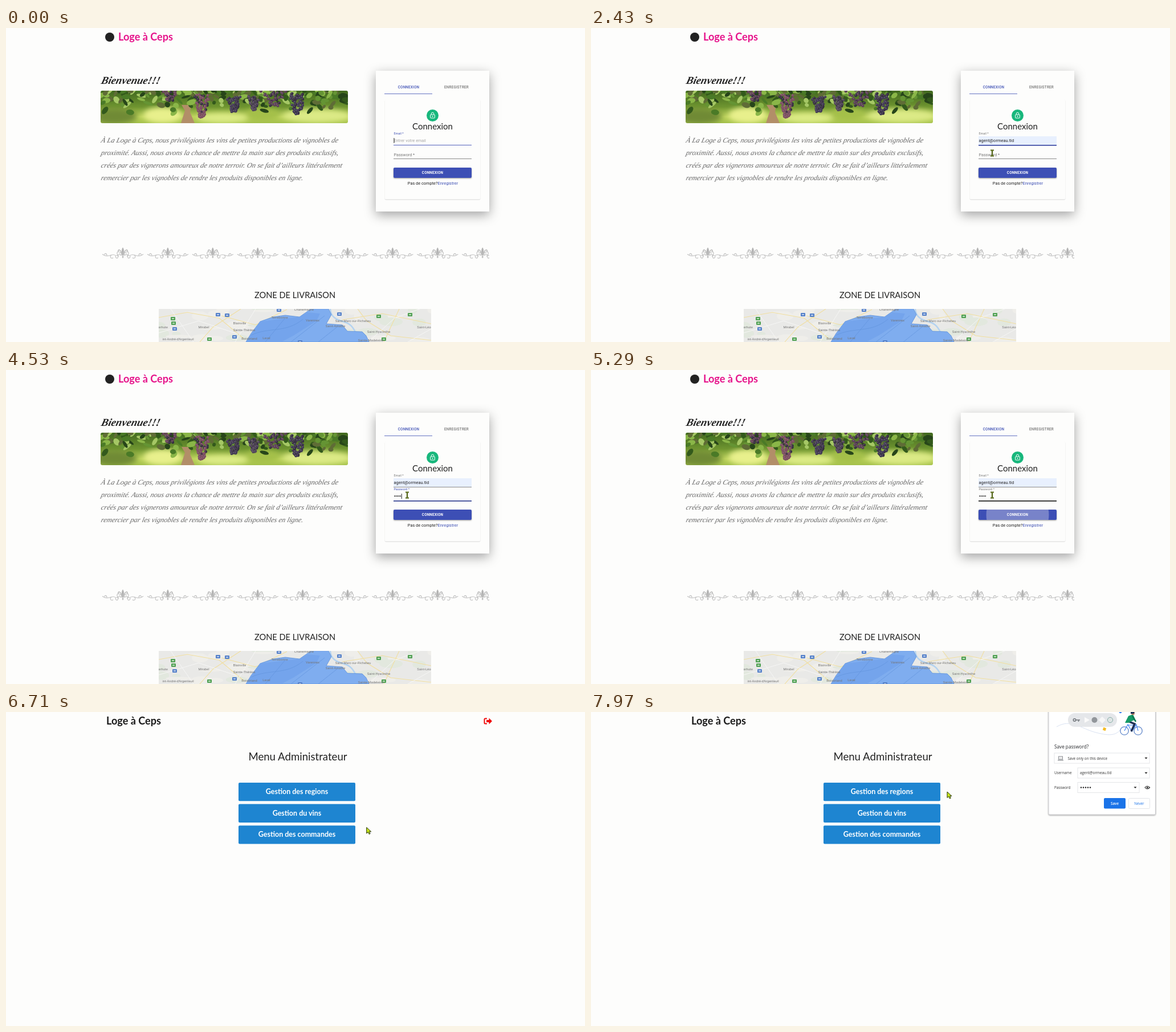
Recreate the animation shown at these times as an HTML page. Size 1016 px wide and 551 px high, loop 8000 ms.

```html
<!DOCTYPE html>
<html lang="fr">
<head>
<meta charset="utf-8">
<title>La Loge à Ceps</title>
<style>
  html, body { margin: 0; width: 100%; height: 100%; overflow: hidden; background: #fdfdfc; }
  svg { display: block; width: 1016px; height: 551px; }
  text { white-space: pre; }
  .lato { font-family: Lato, sans-serif; }
  .robo { font-family: Roboto, sans-serif; }
  .open { font-family: "Open Sans", "Noto Sans", sans-serif; }
  .script { font-family: "Liberation Serif", "Noto Serif", serif; font-style: italic; }
  .mid { text-anchor: middle; }
</style>
</head>
<body>
<svg id="stage" viewBox="0 0 1016 551" xmlns="http://www.w3.org/2000/svg"></svg>
<script>
const LOOP = 8000;
const PAPER = '#fdfdfc';
const stage = document.getElementById('stage');

// Markup helpers
const text = (x, y, size, str, cls, fill = '#222', more = '') =>
  `<text x="${x}" y="${y}" font-size="${size}" class="${cls}" fill="${fill}" ${more}>${str}</text>`;
const rect = (x, y, w, h, fill, more = '') =>
  `<rect x="${x}" y="${y}" width="${w}" height="${h}" fill="${fill}" ${more}/>`;
const oval = (x, y, rx, ry, fill, more = '') =>
  `<ellipse cx="${x}" cy="${y}" rx="${rx}" ry="${ry}" fill="${fill}" ${more}/>`;
const path = (d, stroke, width = 1, fill = 'none', more = '') =>
  `<path d="${d}" stroke="${stroke}" stroke-width="${width}" fill="${fill}" ${more}/>`;
const group = (id, body, more = '') => `<g id="${id}" ${more}>${body}</g>`;
const BOLD = 'font-weight="700"', MEDIUM = 'font-weight="500"';

function seeded(seed) {
  return () => (seed = (seed * 16807) % 2147483647) / 2147483647;
}

const shadow = (id, dy, blur, opacity) =>
  `<filter id="${id}" x="-30%" y="-30%" width="160%" height="180%">
    <feDropShadow dx="0" dy="${dy}" stdDeviation="${blur}" flood-color="#000" flood-opacity="${opacity}"/></filter>`;

const defs = `<defs>
  ${shadow('panelShadow', 6, 10, .36)}${shadow('lift', 1, 1.1, .4)}${shadow('faint', .6, .7, .3)}
  <filter id="soft"><feGaussianBlur stdDeviation=".5"/></filter>
  <filter id="haze"><feGaussianBlur stdDeviation="5"/></filter>
  <linearGradient id="vines" x2="0" y2="1">
    <stop offset="0" stop-color="#41681f"/><stop offset=".5" stop-color="#6f9530"/>
    <stop offset=".8" stop-color="#bdd35c"/><stop offset="1" stop-color="#a3c04a"/></linearGradient>
  <clipPath id="photoClip"><rect x="166" y="110" width="434" height="57" rx="3"/></clipPath>
  <clipPath id="mapClip"><rect x="268" y="493" width="478" height="58"/></clipPath>
  <clipPath id="ornamentClip"><rect x="166" y="380" width="682" height="30"/></clipPath>
  <clipPath id="buttonClip"><rect x="680" y="245" width="137" height="18" rx="2"/></clipPath>
  <clipPath id="listClip"><rect id="listWindow" x="680" y="207" width="137" height="54"/></clipPath>
  <g id="fleur">${ornament()}</g>
</defs>`;

function ornament() {
  const side = path('M7 401C10 397 15 400 12 403S7 401 10 398M12 400C18 393 25 405 36 397M28 399C28 395 33 395 32 398M20 398C24 402 20 406 17 403M2 396C6 391 11 392 10 396S5 398 6 395', '#c2c2c2', 1.1);
  return side + `<g transform="scale(-1 1)">${side}</g>` +
    path('M0 385C3 389 2 393 1 398H-1C-2 393-3 389 0 385Z', 'none', 0, '#b4b4b4') +
    path('M2 397C3 388 9 388 8 392M-2 397C-3 388-9 388-8 392', '#b8b8b8', 1.6) +
    rect(-5, 397.5, 10, 1.5, '#b8b8b8') + oval(0, 401.5, 1.4, 2.2, '#c0c0c0');
}

function photo() {
  const rnd = seeded(71);
  const pick = list => list[Math.floor(rnd() * list.length)];
  const ground = oval(190, 155, 40, 14, '#6f8a35') + oval(275, 153, 34, 14, '#e8f08c') +
    oval(380, 158, 45, 9, '#dceb86') + oval(450, 152, 30, 12, '#a4c04a') + oval(545, 154, 60, 12, '#dcea86');
  let out = rect(166, 110, 434, 57, 'url(#vines)') + `<g filter="url(#haze)">${ground}</g>`;
  out += path('M307 167L314 145L308 135H325L323 148L331 167Z', 'none', 0, '#b28e68');
  for (let i = 0; i < 230; i++) {
    const x = 166 + rnd() * 434, y = 109 + rnd() * rnd() * 42;
    out += oval(x, y, 3 + rnd() * 6, 2 + rnd() * 3,
      pick(['#33591c', '#4a7a27', '#659434', '#8ab648', '#27451a', '#5f6c36', '#a5c765']),
      `transform="rotate(${rnd() * 120 - 60} ${x} ${y})"`);
  }
  const clusters = [[288, 110, 15, 18, '#684658'], [344, 117, 14, 40, '#7d5060'],
    [400, 121, 13, 26, '#443c55'], [435, 120, 10, 24, '#52485a'],
    [471, 109, 25, 28, '#5c4356'], [511, 115, 16, 36, '#413c54']];
  for (const [cx, top, half, tall, tone] of clusters) {
    for (let i = 0; i < tall * 1.6; i++) {
      const v = i / tall / 1.6, x = cx + (rnd() * 2 - 1) * half * (1 - v * .7), y = top + v * tall;
      out += oval(x, y, 2.5, 2.5, rnd() < .3 ? '#352e40' : tone) + oval(x - .7, y - .8, .9, .8, '#a98fa8', 'opacity=".55"');
    }
  }
  return `<g clip-path="url(#photoClip)"><g filter="url(#soft)">${out}</g></g>`;
}

function map() {
  const rnd = seeded(19);
  let out = rect(268, 493, 478, 58, '#e9e9e7');
  for (let i = 0; i < 34; i++)
    out += oval(268 + rnd() * 478, 493 + rnd() * 58, 5 + rnd() * 18, 2 + rnd() * 6, rnd() < .4 ? '#e2e8de' : '#efeeea');
  out += path('M268 508L318 499L374 509L417 545M340 551L363 525L412 493M378 505L438 521L493 494M617 493L633 514L675 540L746 548M590 512L660 501L746 519M690 493L663 551', '#f1dfa0', 1.1);
  out += path('M268 535L338 514L407 537M289 493L329 551M438 493L402 551M636 551L682 509L726 493M705 551L746 528', '#f8f8f6', .9);
  out += path('M569 493C570 510 583 512 597 517S614 538 622 551', '#b4d3f0', 2.5);
  out += path('M421 551L430 536L446 515L469 507L490 504L515 507L535 493H566L571 503L562 519L590 521L599 532L625 533L632 540L637 551Z', '#5c90da', .8, '#7fadef');
  out += path('M421 551L446 515L515 507L529 499L551 501L545 514L504 540L483 551Z', 'none', 0, '#74a4ec');
  out += path('M430 539C462 524 491 536 521 511M455 551L489 510M500 551L559 505M548 551L583 523', '#6294dd', .7);
  const shield = (x, y, fill) => rect(x - 4, y - 3, 8, 6, fill, 'rx="1"') + rect(x - 2, y - .6, 4, 1.2, '#fff');
  for (const [x, y] of [[293, 510], [294, 518], [357, 546], [709, 503], [654, 506], [663, 546]]) out += shield(x, y, '#4fa052');
  for (const [x, y] of [[372, 503], [388, 504], [296, 528], [401, 542], [479, 495], [585, 502], [516, 551]]) out += shield(x, y, '#5480c9');
  const towns = [[410, 520, 'Blainville'], [418, 532, 'Sainte-Thérèse'], [427, 547, 'Boisbriand'], [347, 527, 'Mirabel'],
    [523, 496, 'Charlemagne'], [480, 510, 'Terrebonne'], [457, 546, 'Laval'], [578, 525, 'Saint-Amable'],
    [609, 516, 'Saint-Marc-sur-Richelieu'], [654, 535, 'Saint-Hyacinthe'], [640, 550, 'Sainte-Madeleine'],
    [735, 527, 'Saint-Léon'], [274, 527, 'herhute'], [302, 548, "int-André-d'Argenteuil"], [538, 515, 'Varennes']];
  for (const [x, y, name] of towns) out += text(x, y, 5.8, name, 'robo mid', '#777');
  return `<g clip-path="url(#mapClip)">${out}</g>`;
}

// Handwriting leans further than the plain italic
const handwritten = (x, y, size, str, fill, more) =>
  `<g transform="translate(${x} ${y}) skewX(-14)">${text(0, 0, size, str, 'script', fill, more)}</g>`;

function home() {
  let out = oval(182, 16, 8, 8, '#222') + text(197, 22, 18.1, 'Loge à Ceps', 'lato', '#e6148b', BOLD);
  out += handwritten(166, 98, 18.6, 'Bienvenue!!!', '#222', BOLD) + photo();
  ['À La Loge à Ceps, nous privilégions les vins de petites productions de vignobles de',
   'proximité. Aussi, nous avons la chance de mettre la main sur des produits exclusifs,',
   'créés par des vignerons amoureux de notre terroir. On se fait d’ailleurs littéralement',
   'remercier par les vignobles de rendre les produits disponibles en ligne.']
    .forEach((line, i) => out += handwritten(166, 200.5 + i * 22, 12.5, line, '#666'));
  out += '<g clip-path="url(#ornamentClip)">';
  for (let i = 0; i < 9; i++) out += `<use href="#fleur" x="${205 + i * 78.9}"/>`;
  out += '</g>' + text(507, 474, 14.6, 'ZONE DE LIVRAISON', 'lato mid') + map();
  return out + loginPanel();
}

function loginPanel() {
  let out = rect(649, 75, 199, 247, PAPER, 'filter="url(#panelShadow)"');
  const caps = MEDIUM + ' letter-spacing=".2"';
  out += text(706.5, 105.7, 6.3, 'CONNEXION', 'robo mid', '#3f51b5', caps) +
    text(790.5, 105.7, 6.3, 'ENREGISTRER', 'robo mid', '#757575', caps) +
    rect(664, 115, 84, 1, '#6573c3') + rect(664.5, 126, 168, 174.5, PAPER, 'rx="2" filter="url(#faint)"');
  out += oval(748.5, 153.5, 10.5, 10.5, '#18b77c') +
    rect(744.7, 152, 7.6, 6, 'none', 'rx=".7" stroke="#fff"') +
    path('M746.3 152V150.5A2.2 2.2 0 0 1 750.7 150.5V152', '#fff') + oval(748.5, 155, .9, .9, '#fff');
  out += text(748.5, 178, 15, 'Connexion', 'lato mid');
  out += rect(680, 190, 137, 16, '#e8f0fe', 'id="autofill"') +
    text(680.5, 187, 5.4, 'Email *', 'robo', '#3f51b5', 'id="emailLabel"') +
    text(680.5, 200.2, 7.5, '', 'robo', '#222', 'id="emailText"') +
    rect(680, 205, 137, 1, '#3f51b5', 'id="emailLine"');
  out += text(680.5, 224.5, 7.2, 'Password *', 'robo', '#777', 'id="passLabel"') +
    rect(680, 229, 137, 1, '#8a8a8a', 'id="passLine"');
  for (let i = 0; i < 5; i++) out += oval(682 + i * 2.55, 221.2, .95, .95, '#222', `id="dot${i}"`);
  out += rect(0, 193, .9, 9, '#111', 'id="caret"');
  out += rect(680, 245, 137, 18, '#3c50b5', 'rx="2" filter="url(#lift)"') +
    `<g clip-path="url(#buttonClip)"><circle id="ripple" cx="748.5" cy="254" fill="#7883c9"/></g>` +
    text(748.5, 256, 6.3, 'CONNEXION', 'robo mid', '#fff', BOLD + ' letter-spacing=".2"');
  out += `<text x="749" y="274.5" font-size="7.4" class="robo mid" fill="#222">Pas de compte?<tspan fill="#3f51b5">Enregistrer</tspan></text>`;
  let rows = '';
  ['tom@ormeau.tld', 'agent@ormeau.tld', 'julie@ormeau.tld', 'marc@ormeau.tld', 'nadia@ormeau.tld']
    .forEach((mail, i) => rows += text(687, 224.6 + i * 21.2, 7.5, mail, 'robo', '#222', `id="mail${i}" ${MEDIUM}`));
  return out + group('list', rect(680, 207, 137, 54, PAPER, 'id="listBack" filter="url(#faint)"') +
    `<g clip-path="url(#listClip)">${rows}</g>` + rect(680.5, 261, 136, 2, '#3c50b5', 'id="buttonEdge"'));
}

function admin() {
  let out = text(176, 22, 18.1, 'Loge à Ceps', 'lato', '#1b1b1b', BOLD);
  out += path('M844 11.5H841Q839.5 11.5 839.5 13V19Q839.5 20.5 841 20.5H844', '#f00c0c', 2) +
    path('M843 14H847.5V10.5L853 16L847.5 21.5V18H843Z', 'none', 0, '#f00c0c');
  out += text(512, 85, 18.6, 'Menu Administrateur', 'lato mid');
  ['Gestion des regions', 'Gestion du vins', 'Gestion des commandes'].forEach((label, i) =>
    out += rect(408, 124 + i * 37.6, 205, 32.3, '#1e85d1', 'rx="2"') +
      text(510.5, 144 + i * 37.6, 12.5, label, 'lato mid', '#fff', BOLD));
  return out;
}

function breachDialog() {
  let out = rect(381, -10, 262, 166.5, '#fff', 'rx="2" stroke="#b8b5cc" filter="url(#lift)"') + rect(381.5, 0, 261, 46, '#f7f7f9');
  out += path('M382 20Q391 14 398 22T416 31', '#e3e3e5', 1.2) + path('M405 25Q419 39 435 26', '#b9babd', 3) +
    path('M412 4V14M407.5 6.5L416.5 11.5M416.5 6.5L407.5 11.5', '#d2d3d6', 1.2);
  out += rect(447, -5, 39, 47, '#f4f5f7', 'rx="3" stroke="#dfe1e5"') + path('M487 35H537M487 33H529V0', '#d3d5d9', 1) +
    path('M530 12Q532 2 548 -1', '#b6b7ba', 3) + path('M620 18Q621 13 625 15Q629 13 630 18Z', 'none', 0, '#d8d9dc');
  out += rect(476, 10.5, 38, 14, '#fff', 'rx="1" stroke="#d5e3f5"');
  for (const x of [484.5, 493.5, 502])
    out += path(`M${x} 14V21M${x - 3} 15.7L${x + 3} 19.3M${x + 3} 15.7L${x - 3} 19.3`, '#3c7de0', 1.3);
  out += rect(507, 13.5, 1, 8, '#555') + path('M467 5L480 26.5H454Z', '#e8412f', 2, '#e8412f', 'stroke-linejoin="round"') +
    rect(466, 12, 2, 7, '#fff') + oval(467, 22, 1.2, 1.2, '#fff');
  out += text(390.5, 67, 8.2, 'Check your passwords', 'open', '#27292c');
  ['Velune found the password you just used in a data breach. To secure your',
   'accounts, we recommend changing it now and then checking your saved', 'passwords.']
    .forEach((line, i) => out += text(390.5, 87.7 + i * 11.6, 6.15, line, 'open', '#606368'));
  out += oval(397.5, 138, 3.8, 3.8, 'none', 'stroke="#5f6368"') + rect(397, 137, 1, 3.4, '#5f6368') + rect(397, 135.3, 1, 1, '#5f6368');
  out += rect(518, 128, 74, 19, '#1a73e8', 'rx="2" stroke="#174ea6" stroke-width=".8"') +
    rect(519.3, 129.3, 71.4, 16.4, 'none', 'rx="1.5" stroke="#d6e5fb" stroke-width=".8"') +
    text(555, 140, 6.4, 'Check passwords', 'open mid', '#fff', 'font-weight="600"');
  return out + rect(596.5, 128.5, 36.5, 18, '#fff', 'rx="2" stroke="#dfe1e5"') +
    text(614.5, 140, 6.4, 'Close', 'open mid', '#3d6fae');
}

function savePopup() {
  const field = (x, y, w) => rect(x, y, w, 18, '#fff', 'stroke="#e4e5e8"');
  const arrow = (x, y) => path(`M${x - 2.5} ${y - 1.2}H${x + 2.5}L${x} ${y + 1.6}Z`, 'none', 0, '#222');
  let out = rect(803, -10, 187.5, 190, '#fff', 'rx="2" stroke="#c9c9cd" filter="url(#lift)"');
  out += path('M817 26C842 11 859 29 886 36S922 40 930 30', '#d9e2f2', 1) + rect(837, 2, 86, 24, '#e5e7ea', 'rx="12"');
  out += oval(848.5, 14, 2.2, 2.2, 'none', 'stroke="#74787e" stroke-width="1.6"') + path('M850.5 14H858M855.5 14V17', '#74787e', 1.6) +
    path('M866 9V19L875 14Z', 'none', 0, '#fafafa') + oval(883.5, 14, 5, 5, '#92969b') +
    path('M897 8L903 14L897 20L891 14Z', 'none', 0, '#f7f7f7') + oval(911, 14, 4.6, 4.6, '#dfe5e5', 'stroke="#86ada5"');
  out += rect(898.5, 27.5, 5, 5, '#f5bd27', 'transform="rotate(18 901 30)"') + oval(929, 0, 2.3, 2.3, '#4285f4');
  out += oval(936, 33, 7.2, 7.2, 'none', 'stroke="#5f86c9" stroke-width="1.3"') + oval(960, 33, 7.2, 7.2, 'none', 'stroke="#5f86c9" stroke-width="1.3"') +
    path('M936 33L942 22L949 34L957 22L960 33M942 23H957', '#4285f4', 1.2) +
    path('M942 16L954 21L948 34', '#1e3055', 3.5) + path('M937 19L943 7L951 4L955 13L943 19Z', 'none', 0, '#169b67') +
    path('M950 7L956 17', '#0c7951', 2.5) + oval(951, 2, 3, 3.2, '#b77a5d') + path('M947 0H954L952 3H947Z', 'none', 0, '#1e3055');
  out += text(813, 64, 8.2, 'Save password?', 'open', '#27292c');
  out += field(813, 72, 167) + rect(820.5, 78, 7, 5, '#eee', 'stroke="#8b8e93"') + rect(819, 84, 10, 1.2, '#8b8e93') +
    text(836.5, 83.5, 6.3, 'Save only on this device', 'open', '#333') + arrow(974, 81);
  out += text(813, 109, 6.3, 'Username', 'open', '#333') + field(854, 98, 126) +
    text(858, 109, 6.4, 'agent@ormeau.tld', 'open', '#333') + arrow(974, 107);
  out += text(813, 134.7, 6.3, 'Password', 'open', '#333') + field(854, 123.5, 108) + arrow(955, 132.5);
  for (let i = 0; i < 5; i++) out += oval(860 + i * 4, 132.5, 1.2, 1.2, '#222');
  out += path('M972 132.5Q976 127.5 980.5 132.5Q976 137.5 972 132.5Z', '#333', 1.2) + oval(976.2, 132.5, 1.5, 1.5, '#333');
  out += rect(900, 151, 38, 18.5, '#1a73e8', 'rx="2"') + text(919, 162.5, 6.3, 'Save', 'open mid', '#fff', 'font-weight="600"');
  return out + rect(943.5, 151.5, 37, 18, '#fff', 'rx="2" stroke="#e2e4e8"') + text(962, 162.5, 6.3, 'Never', 'open mid', '#1a73e8');
}

const BEAM = 'M-3 -5H3M0 -5V5M-3 5H3';
const pointers =
  group('arrow', path('M0 0V10.5L2.6 8.2L4.5 12L6.4 11L4.6 7.5H8Z', '#24300a', 1, '#c8e818')) +
  group('beam', path(BEAM, '#3a4a12', 2.2) + path(BEAM, '#71851f', .9)) +
  group('hand', path('M-1 1Q0-1 1.5 1V5L5 5.5Q7 6 6.5 8L5.5 12H0L-3 8Q-3 6-1 7Z', '#24300a', 1, '#bede12'));

stage.innerHTML = defs + rect(0, 0, 1016, 551, PAPER) + group('home', home()) +
  group('admin', admin()) + group('breach', breachDialog()) + group('save', savePopup()) + pointers;

const el = Object.fromEntries([...stage.querySelectorAll('[id]')].map(node => [node.id, node]));
const show = (id, on) => el[id].style.display = on ? '' : 'none';
const set = (id, attrs) => { for (const key in attrs) el[id].setAttribute(key, attrs[key]); };
const clamp01 = v => Math.min(1, Math.max(0, v));
const ease = v => v * v * (3 - 2 * v);
const between = (t, a, b) => t >= a && t < b;

// Pointer stops: time, x, y
const stops = [[900, 702, 208], [1420, 702, 208], [1750, 704, 223], [2060, 704, 223], [2450, 704, 219.5], [5500, 704, 219.5],
  [6150, 729, 259], [6500, 729, 259], [7050, 436, 87], [7120, 436, 87], [7500, 617, 138], [7700, 617, 138], [7900, 625, 140], [8000, 625, 140]];
function pointerAt(t) {
  const i = Math.max(1, stops.findIndex(stop => stop[0] > t));
  const [t0, x0, y0] = stops[i - 1], [t1, x1, y1] = stops[i];
  const k = ease(clamp01((t - t0) / (t1 - t0)));
  return [x0 + (x1 - x0) * k, y0 + (y1 - y0) * k];
}

function listHeight(t) {
  if (t < 1380) return 124 * ease(clamp01((t - 920) / 200));
  return t < 1430 ? 54 : 25;
}

const keyTimes = [3350, 3760, 3990, 4240, 4480];

function drawForm(t) {
  const filled = t >= 1850, passFocus = between(t, 2500, 6150), emailFocus = t < 2500;
  el.emailText.textContent = filled ? 'agent@ormeau.tld' : t >= 1380 ? 'a' : 'Entrer votre email';
  set('emailText', { fill: t < 1380 ? '#a5a5a5' : '#222', 'font-size': t < 1380 ? 7.2 : 7.5 });
  set('emailLabel', { fill: t < 1380 ? '#3f51b5' : '#777' });
  set('emailLine', { fill: t < 920 ? '#5362bd' : emailFocus ? '#303f9f' : '#8a8a8a', height: between(t, 920, 2500) ? 1.6 : 1 });
  show('autofill', filled);

  const shrink = ease(clamp01((t - 2500) / 200));
  set('passLabel', { y: 224.5 - 13.4 * shrink, 'font-size': 7.2 - 1.8 * shrink, fill: passFocus && t < 5000 ? '#3f51b5' : '#777' });
  set('passLine', { fill: passFocus ? (t < 5000 ? '#26358c' : '#111') : '#8a8a8a', height: passFocus ? 1.6 : 1 });
  const count = keyTimes.filter(k => t >= k).length;
  keyTimes.forEach((_, i) => show('dot' + i, i < count));

  const caretX = emailFocus ? (t < 1380 ? 680.5 : 684.5) : 681 + count * 2.55;
  set('caret', { x: caretX, y: emailFocus ? 193 : 217 });
  show('caret', t < 500 || between(t, 920, 1850) || (passFocus && t < 5000 && (t - 2500) % 1000 < 500) || between(t, 3350, 3500));

  set('ripple', { r: 80 * clamp01((t - 5085) / 300), fill: t < 6150 ? '#7883c9' : '#6673bb' });

  const height = listHeight(t);
  show('list', between(t, 925, 1850));
  show('buttonEdge', height === 54);
  set('listBack', { height });
  set('listWindow', { height });
  el.mail0.textContent = t < 1430 ? 'tom@ormeau.tld' : 'agent@ormeau.tld';
}

function draw(t) {
  const onHome = t < 6600;
  show('home', onHome);
  show('admin', !onHome);
  show('breach', between(t, 6880, 7660));
  show('save', t >= 7760);
  if (onHome) drawForm(t);

  const [x, y] = pointerAt(t);
  const kind = t < 900 ? '' : between(t, 2300, 5750) ? 'beam' : between(t, 6050, 6600) ? 'hand' : 'arrow';
  for (const id of ['arrow', 'beam', 'hand']) {
    show(id, id === kind);
    set(id, { transform: `translate(${x} ${y})` });
  }
}

const start = performance.now();
function tick() {
  draw((performance.now() - start) % LOOP);
  requestAnimationFrame(tick);
}
tick();
</script>
</body>
</html>
```
